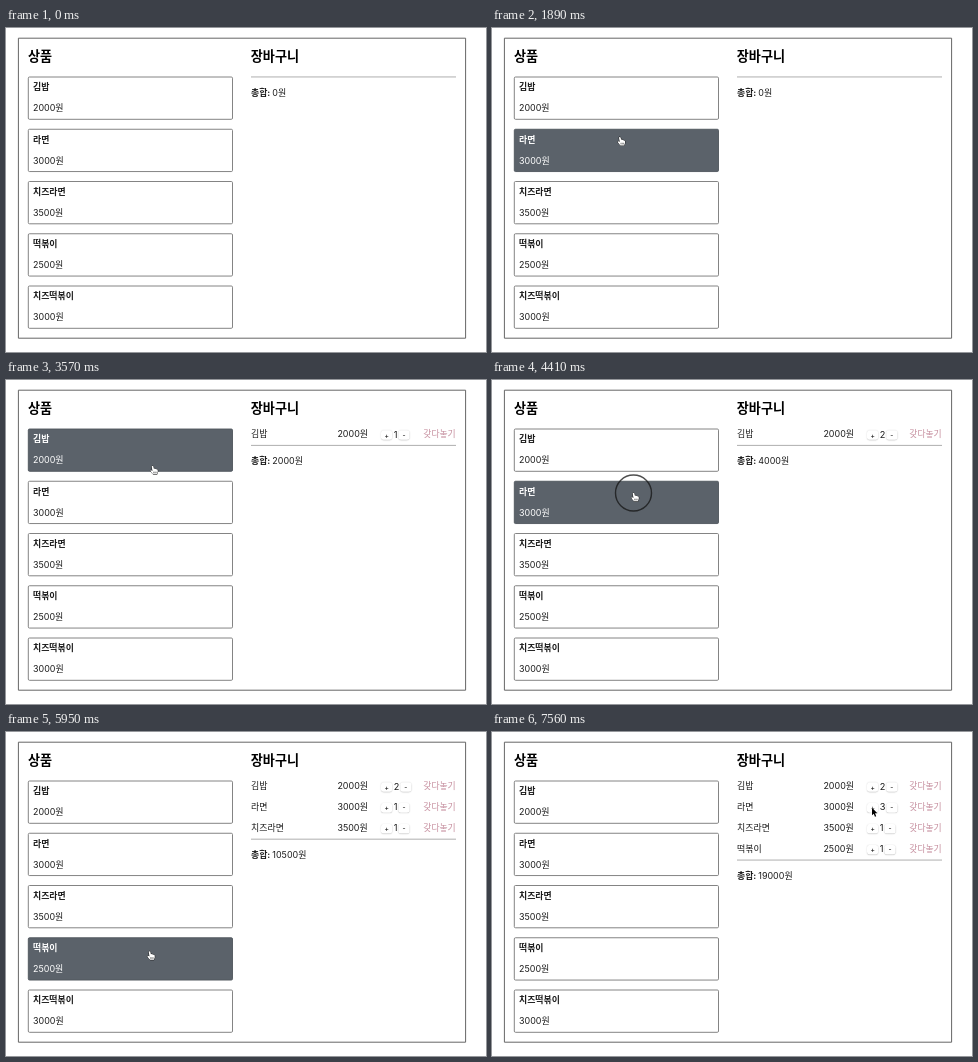
An HTML page with a canvas for the animation above (8000 ms loop, 480 px wide and 324 px high).

```html
<!DOCTYPE html>
<html lang="ko">
<head>
<meta charset="utf-8">
<title>장바구니</title>
<style>
html, body { margin: 0; width: 100%; height: 100%; overflow: hidden; background: #fff; }
canvas { display: block; width: 480px; height: 324px; }
</style>
</head>
<body>
<canvas id="stage"></canvas>
<script>
const W = 480, H = 324, LOOP = 8000, STEP = 70, LAST = 7560;
const PRESS = 140, LAG = 70;
const FAMILY = "Inter, 'Noto Sans CJK KR', 'Noto Sans CJK', sans-serif";
const INK = '#1c1c1c';

const canvas = document.getElementById('stage');
const ctx = canvas.getContext('2d');
const dpr = window.devicePixelRatio || 1;
canvas.width = W * dpr;
canvas.height = H * dpr;

const products = [
  { name: '김밥', price: 2000 },
  { name: '라면', price: 3000 },
  { name: '치즈라면', price: 3500 },
  { name: '떡볶이', price: 2500 },
  { name: '치즈떡볶이', price: 3000 }
];

const clicks = [
  { at: 2520, item: 0 },
  { at: 3640, item: 0 },
  { at: 4410, item: 1 },
  { at: 5110, item: 2 },
  { at: 5810, item: 3 },
  { at: 7070, item: 1 },
  { at: 7350, item: 1 }
];

// The pointer eases to each spot and rests there until the next move.
const entry = { x: 150, y: 200 };
const moves = [
  { from: 350, to: 1050, x: 143.5, y: 71 },
  { from: 1050, to: 1190, x: 127, y: 69.5 },
  { from: 1400, to: 2100, x: 128, y: 120 },
  { from: 2240, to: 2420, x: 133, y: 81 },
  { from: 3290, to: 3430, x: 142, y: 96.5 },
  { from: 3430, to: 3570, x: 146.5, y: 86 },
  { from: 3780, to: 4200, x: 141.5, y: 113 },
  { from: 4550, to: 4900, x: 139, y: 166 },
  { from: 5250, to: 5670, x: 143.5, y: 219.5 },
  { from: 6090, to: 6860, x: 380, y: 76 }
];

const cardTop = i => 49 + 52.25 * i;
const rowMid = i => 54.2 + 20.9 * i;

function pointerAt(t) {
  if (t < moves[0].from) return null;
  let { x, y } = entry;
  for (const m of moves) {
    const u = Math.max(0, Math.min(1, (t - m.from) / (m.to - m.from)));
    const e = u * u * (3 - 2 * u);
    x += (m.x - x) * e;
    y += (m.y - y) * e;
  }
  return { x, y };
}

function text(str, x, mid, size = 8.95, weight = 400, color = INK) {
  ctx.font = `${weight} ${size}px ${FAMILY}`;
  ctx.fillStyle = color;
  ctx.fillText(str, x, mid + size * 0.36);
}

function box(x, y, w, h, r, fill, stroke, line = 1) {
  ctx.beginPath();
  ctx.roundRect(x, y, w, h, r);
  ctx.fillStyle = fill;
  ctx.fill();
  ctx.strokeStyle = stroke;
  ctx.lineWidth = line;
  ctx.stroke();
}

function drawCard(item, i, hover) {
  const y = cardTop(i), color = hover ? '#fff' : INK;
  box(22.3, y, 204.2, 42.3, 1.2, hover ? '#5b626a' : '#fff', hover ? '#50565d' : '#777', 0.9);
  text(item.name, 27, y + 10.1, 8.9, 700, color);
  text(item.price + '원', 27, y + 31.2, 8.95, 400, color);
}

function drawButton(sign, x, mid) {
  ctx.save();
  ctx.shadowColor = 'rgba(0,0,0,.28)';
  ctx.shadowBlur = 1.2 * dpr;
  ctx.shadowOffsetY = 0.4 * dpr;
  ctx.beginPath();
  ctx.roundRect(x, mid - 4, 11.2, 9.6, 2.4);
  ctx.fillStyle = '#fff';
  ctx.fill();
  ctx.restore();
  ctx.textAlign = 'center';
  text(sign, x + 5.6, mid + 1, 6.6, 500, '#222');
  ctx.textAlign = 'left';
}

function drawCart(cart) {
  let total = 0, row = 0;
  for (const [i, count] of cart) {
    const { name, price } = products[i], y = rowMid(row++);
    total += price * count;
    text(name, 245, y);
    text(price + '원', 331.4, y);
    drawButton('+', 375, y);
    text(count, 387.8, y, 9.2);
    drawButton('-', 388.6 + ctx.measureText(count).width, y);
    text('갖다놓기', 417.3, y, 8.8, 400, '#c58d9d');
  }
  const rule = row ? rowMid(row - 1) + 11.2 : 49;
  ctx.fillStyle = '#a6a6a6';
  ctx.fillRect(245, rule - 0.5, 205, 0.9);
  text('총합:', 245, rule + 15.6, 8.9, 700);
  text(total + '원', 266.3, rule + 15.6);
}

function drawRing(x, y) {
  ctx.beginPath();
  ctx.arc(x, y, 18, 0, Math.PI * 2);
  ctx.strokeStyle = 'rgba(20,20,20,.75)';
  ctx.lineWidth = 1.4;
  ctx.stroke();
}

function drawPointer(x, y, hand) {
  const shape = new Path2D(hand
    ? 'M-1 .6Q0-.6 1 .6L1.6 3.4Q2.6 2.8 3.2 3.8Q4.2 3.3 4.7 4.3Q6 4 6.2 5.2' +
      'Q6.6 7.4 5.6 8.8L5.4 10.2H.8Q-.6 8.6-1.7 7.3Q-3 5.8-2.3 5.4Q-1.4 5 0 6.2Z'
    : 'M0 0V9L2.1 7.1L3.5 10.6L5 10L3.6 6.6H6.4Z');
  ctx.save();
  ctx.translate(x, y - 0.2);
  ctx.scale(0.84, 0.84);
  ctx.lineJoin = 'round';
  ctx.strokeStyle = hand ? '#1a1a1a' : '#fff';
  ctx.lineWidth = 1.1;
  ctx.fillStyle = hand ? '#fff' : '#000';
  ctx.stroke(shape);
  ctx.fill(shape);
  if (hand) {
    ctx.lineWidth = 0.6;
    ctx.stroke(new Path2D('M1.4 7V9M2.9 7V9M4.3 7V9'));
  }
  ctx.restore();
}

function draw(t) {
  ctx.setTransform(dpr, 0, 0, dpr, 0, 0);
  ctx.fillStyle = '#fff';
  ctx.fillRect(0, 0, W, H);
  box(12.4, 10.2, 447.2, 300, 0, '#fff', '#666');
  text('상품', 22, 28, 13.1, 700, '#000');
  text('장바구니', 244.8, 28, 13.1, 700, '#000');

  const p = pointerAt(t);
  const over = i => p && p.x > 22 && p.x < 227 &&
    p.y >= cardTop(i) && p.y <= cardTop(i) + 43;
  products.forEach((item, i) => drawCard(item, i, over(i)));

  const cart = new Map();
  for (const { at, item } of clicks) {
    if (t >= at + PRESS + LAG) cart.set(item, (cart.get(item) || 0) + 1);
  }
  drawCart(cart);

  if (!p) return;
  const hand = products.some((_, i) => over(i));
  const pressed = clicks.some(c => t >= c.at && t < c.at + PRESS);
  if (pressed) drawRing(p.x, p.y + (hand ? 0 : 5.5));
  drawPointer(p.x, p.y, hand);
}

const start = performance.now();
function tick() {
  const t = (performance.now() - start) % LOOP;
  draw(Math.min(LAST, Math.floor(t / STEP) * STEP));
  requestAnimationFrame(tick);
}
tick();
</script>
</body>
</html>
```
